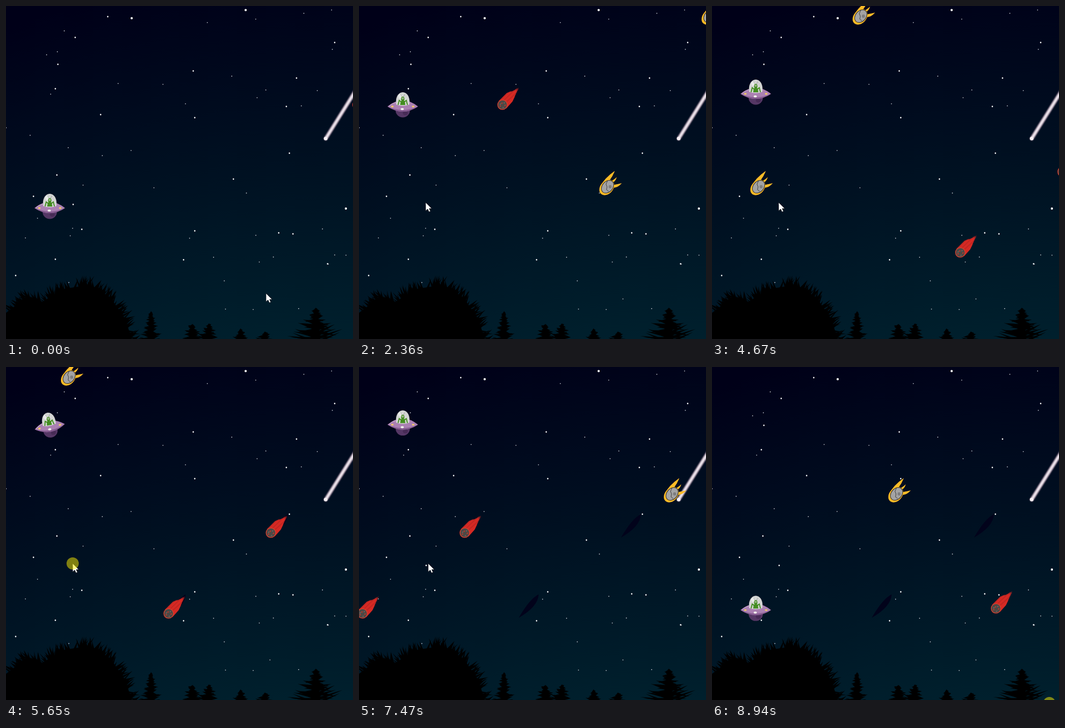
Write an HTML page with a canvas that moves like this. It is 682x656 px and loops after 9010 ms.

```html
<!DOCTYPE html>
<html lang="en">
<head>
<meta charset="utf-8">
<title>Night flight</title>
<style>
html, body { margin: 0; width: 100%; height: 100%; overflow: hidden; background: #000a1c; }
canvas { display: block; width: 100vw; height: 100vh; }
</style>
</head>
<body>
<canvas id="stage" width="682" height="656"></canvas>
<script>
const W = 682, H = 656, LOOP = 9010, STEPS = 129;
const stage = document.getElementById('stage').getContext('2d');

function makeRandom(seed) {
  return (min = 0, max = 1) => {
    seed = (seed * 16807) % 2147483647;
    return min + (max - min) * seed / 2147483647;
  };
}

function poly(c, pts, fill, stroke) {
  c.beginPath();
  pts.forEach(p => c.lineTo(...p));
  c.closePath();
  c.fillStyle = fill;
  c.fill();
  if (stroke) { c.strokeStyle = stroke; c.lineWidth = 0.8; c.stroke(); }
}

function oval(c, x, y, rx, ry, fill, turn = 0) {
  c.beginPath();
  c.ellipse(x, y, rx, ry, turn, 0, 2 * Math.PI);
  c.fillStyle = fill;
  c.fill();
}

function line(c, pts, color, width) {
  c.beginPath();
  pts.forEach(p => c.lineTo(...p));
  c.strokeStyle = color;
  c.lineWidth = width;
  c.lineCap = 'round';
  c.stroke();
}

// Fills a shape of two curves from a to b, bulging through the control points.
function lens(c, a, up, b, down, fill) {
  c.beginPath();
  c.moveTo(...a);
  c.quadraticCurveTo(...up, ...b);
  c.quadraticCurveTo(...down, ...a);
  c.fillStyle = fill;
  c.fill();
}

const brightStars = [
  [247, 24], [471, 8], [668, 399], [200, 21], [136, 62], [102, 115], [97, 163], [186, 214],
  [368, 128], [371, 220], [571, 142], [551, 198], [646, 72], [557, 290], [447, 341], [371, 443],
  [349, 500], [536, 447], [564, 449], [632, 508], [100, 333], [132, 391], [149, 440], [97, 499],
  [19, 531], [54, 375]
];

function drawStars(c) {
  const rand = makeRandom(41);
  brightStars.forEach(([x, y], i) => oval(c, x, y, i < 3 ? 2.2 : 1.4, i < 3 ? 2.2 : 1.4, '#fff'));
  for (let i = 0; i < 44; i++) oval(c, rand(0, W), rand(0, 610), 0.9, 0.9, '#d0d6dc');
}

// A pointed leaf from its root towards the given angle.
function leaf(c, x, y, angle, length, width) {
  const dx = Math.cos(angle), dy = Math.sin(angle);
  poly(c, [[x - dy * width, y + dx * width], [x + dx * length, y + dy * length],
    [x + dy * width, y - dx * width]], '#000');
}

function drawBush(c) {
  const rand = makeRandom(7);
  const crown = [[-10, 612], [40, 574], [70, 584], [110, 558], [165, 549], [205, 574], [234, 616], [252, 670]];
  poly(c, [...crown, [-10, 670]], '#000');
  for (let i = 1; i < crown.length; i++) {
    const [x0, y0] = crown[i - 1], [x1, y1] = crown[i];
    for (let k = 0; k < 26; k++) {
      const u = rand(), x = x0 + (x1 - x0) * u, y = y0 + (y1 - y0) * u;
      const out = Math.atan2(y - 690, x - 130) + rand(-0.5, 0.5);
      leaf(c, x - 8 * Math.cos(out), y - 8 * Math.sin(out), out, rand(15, 30), rand(2, 3.5));
    }
  }
}

function drawFir(c, x, top, half) {
  const rand = makeRandom(x), height = H - top;
  leaf(c, x, top + 14, -Math.PI / 2, 14, 4);
  for (let y = 4; y < height + 8; y += 2.5) {
    for (const side of [-1, 1]) {
      const reach = (3 + half * y / height) * rand(0.55, 1.15);
      const lift = rand(-0.5, 0.25);
      leaf(c, x, top + y, side > 0 ? lift : Math.PI - lift, reach, 3.5);
    }
  }
}

function makeBackdrop() {
  const canvas = document.createElement('canvas');
  canvas.width = W;
  canvas.height = H;
  const c = canvas.getContext('2d');
  const sky = c.createRadialGradient(620, 1900, 1244, 620, 1900, 1960);
  sky.addColorStop(0, '#00202d');
  sky.addColorStop(0.5, '#001021');
  sky.addColorStop(1, '#000018');
  c.fillStyle = sky;
  c.fillRect(0, 0, W, H);
  drawStars(c);

  const streak = [[628.5, 261], [692, 159]];
  c.filter = 'blur(1px)';
  line(c, streak, '#8d7b8e', 8);
  line(c, streak, '#f0e8ef', 4.5);
  c.filter = 'none';
  oval(c, 628.3, 261, 3.6, 3.6, '#f6f0f4');

  drawBush(c);
  [[285, 601, 18], [366, 626, 22], [399, 625, 20], [461, 635, 13], [509, 641, 14], [609, 594, 46]]
    .forEach(tree => drawFir(c, ...tree));
  return canvas;
}

function drawRed(c) {
  const rand = makeRandom(5);
  c.save();
  c.translate(10.5, 36.5);
  c.rotate(-0.81);
  for (let i = 0; i <= 8; i++) {
    const s = i / 4 - 1, root = s * 7, tip = 50 - 18 * Math.abs(s) - rand(0, 5);
    poly(c, [[0, root - 3.5], [tip * 0.7, s * 8 - 2], [tip, s * 6], [tip * 0.6, s * 8 + 2], [0, root + 3.5]],
      i % 3 ? '#d62a24' : '#c02622');
  }
  oval(c, 0, 0, 10.2, 10, '#d2402f');
  oval(c, 0, 0, 8.6, 8.6, '#4c4845');
  for (let i = 0; i < 6; i++) {
    oval(c, 5 * Math.cos(i), 5 * Math.sin(i * 2), 1.7, 1.2, i % 2 ? '#b63b2c' : '#6a625d');
  }
  c.restore();
}

function drawYellow(c) {
  const flame = '#fdbb26';
  oval(c, 14.5, 32.5, 17, 12.5, flame, -0.85);
  lens(c, [2, 30], [10, 14], [30, 0], [27, 12], flame);
  lens(c, [4, 34], [22, 10], [30, 0], [23, 20], flame);
  lens(c, [14, 24], [28, 19], [34, 12], [31, 26], flame);
  lens(c, [18, 30], [34, 26], [44, 24], [32, 38], flame);
  oval(c, 16, 31, 14.5, 10.8, '#2f2a26', -0.85);
  oval(c, 16, 31, 13.5, 9.8, '#a3a3a4', -0.85);
  line(c, [[16, 19], [13, 26], [15, 31], [14, 37], [18, 40]], '#3c3a3a', 1);
  oval(c, 21, 31, 3, 3.2, '#7d7d7f');
}

// One slot opens per interval; slots without a drawing stay empty.
const slots = [[158, drawRed], [325, drawYellow], [-11, drawYellow], [449, drawRed],
  [290, drawRed], [], [219, drawYellow], [439, drawRed]];

function drawMeteors(c, f) {
  slots.forEach(([y, draw], i) => {
    const x = 680.5 + 201 * i - 12.03 * f;
    if (!draw || x > W || x < -50) return;
    c.save();
    c.translate(x, y);
    draw(c);
    c.restore();
  });
}

function drawShadow(c, x, y) {
  lens(c, [x, y + 46], [x + 22, y + 8], [x + 39, y], [x + 38, y + 24], '#02031b');
}

// Every flap leads to a peak; free flight around each one is a parabola.
const GRAVITY = 4.85;
const peaks = [[0, 370], [12, 225], [26, 179], [34, 170], [42, 188], [54.5, 150], [67, 145],
  [76, 130], [85, 12], [103, 8], [119, 58]];
const arc = ([peak, top], f) => top + GRAVITY * (f - peak) ** 2;
const nearest = f => peaks.reduce((a, b) => arc(b, f) < arc(a, f) ? b : a);
const flapping = f => nearest(f) !== nearest(Math.max(0, f - 3));

function drawShip(c, f) {
  c.save();
  c.translate(86, arc(nearest(f), f) + 28);
  if (flapping(f)) c.rotate(-0.18);
  oval(c, 0, 8, 14, 13.5, '#553765');
  oval(c, 5, 13, 5, 4, '#472b56');
  lens(c, [-30, 0], [0, -24], [30, 0], [0, 20], '#aa80b2');
  lens(c, [-30, 0], [0, 14], [30, 0], [0, 20], '#865c91');
  line(c, [[-27, -1], [-20, -6], [-14, -8]], '#d3b2d6', 1);

  c.beginPath();
  c.moveTo(-13, -4);
  c.bezierCurveTo(-17, -36, 17, -36, 13, -4);
  c.quadraticCurveTo(0, 1, -13, -4);
  c.fillStyle = '#d3d4d3';
  c.fill();
  oval(c, -5, -20, 4, 4.5, '#e9eae9');

  const green = '#438d20';
  for (const side of [-1, 1]) {
    line(c, [[side * 4, -24], [side, -18]], '#8b958a', 0.8);
    line(c, [[side * 9, -4], [side * 7, -12], [side * 3, -9]], green, 2);
    oval(c, side * 20.5, 0, 2.6, 1.7, '#f2ca62');
  }
  poly(c, [[-4, -11], [4, -11], [5, -3], [-5, -3]], green);
  oval(c, 0, -15, 3.3, 4.5, green);
  oval(c, 0, -16, 1.8, 1.8, '#eef3e5');
  oval(c, 0, -16, 0.8, 0.8, '#17300e');
  oval(c, -1, 5, 3.1, 2, '#f1f1ec');
  c.restore();
}

// Each move: first step, last step, destination.
const moves = [[6, 16, 180, 395], [22, 26, 131, 387], [85, 87, 136, 387], [120, 127, 663, 662]];

function drawPointer(c, f) {
  let x = 511, y = 566;
  for (const [from, to, toX, toY] of moves) {
    const u = Math.min(1, Math.max(0, (f - from) / (to - from)));
    x += (toX - x) * u;
    y += (toY - y) * u;
  }
  c.save();
  c.translate(x, y);
  poly(c, [[0, 0], [0, 16.5], [4, 13], [6.5, 18.5], [9.5, 17.5], [7, 12], [12, 12]], '#fff', '#10161c');
  if (flapping(f) || f >= 127) oval(c, 0, 0, 12, 12, 'rgba(255,240,0,.5)');
  c.restore();
}

const backdrop = makeBackdrop();

function render(now) {
  const f = Math.min(STEPS - 1, Math.floor((now % LOOP) * STEPS / LOOP + 0.3));
  stage.drawImage(backdrop, 0, 0);
  if (f > 80) {
    drawShadow(stage, 515, 290);
    drawShadow(stage, 314, 448);
  }
  drawMeteors(stage, f);
  drawShip(stage, f);
  drawPointer(stage, f);
}

const start = performance.now();
function tick() {
  render(performance.now() - start);
  requestAnimationFrame(tick);
}
tick();
</script>
</body>
</html>
```
